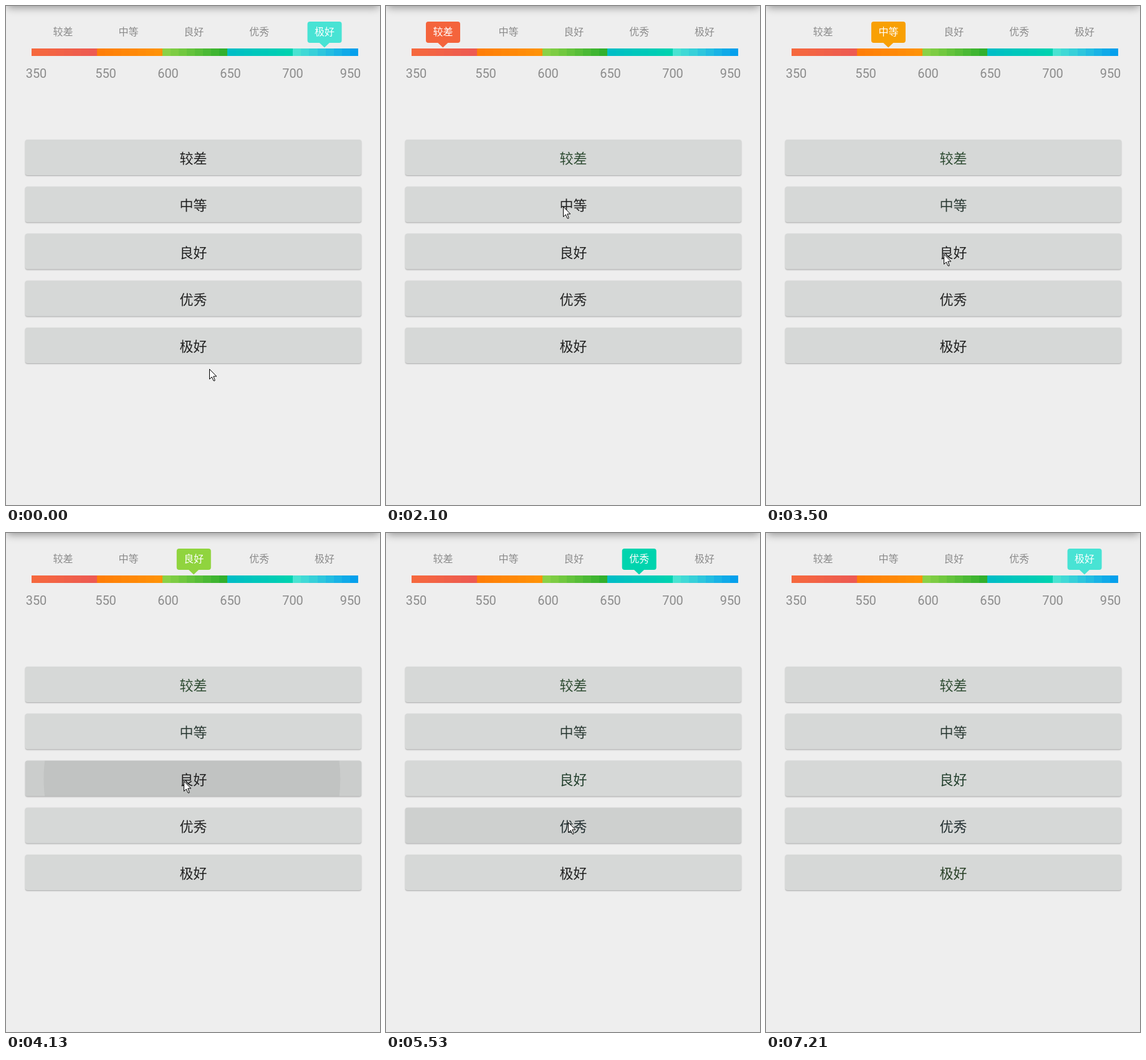
Recreate the animation shown at these times as an HTML page with a canvas. Size 600 px wide and 799 px high, loop 8050 ms.

```html
<!DOCTYPE html>
<html lang="zh-CN">
<head>
<meta charset="utf-8">
<title>评分等级</title>
<style>
html, body { margin: 0; width: 100%; height: 100%; overflow: hidden; background: #eee; }
canvas { display: block; }
</style>
</head>
<body>
<canvas id="stage" width="600" height="799"></canvas>
<script>
const ctx = document.getElementById('stage').getContext('2d');
const LOOP = 8050, STEP = 70;
const CJK = '"Noto Sans CJK SC", "Noto Sans CJK", "Noto Sans SC", sans-serif';

const levels = [
  { name: '较差', bubble: '#f4643c', from: [245, 104, 62], to: [237, 90, 82], ink: '#2f4c33' },
  { name: '中等', bubble: '#f8a004', from: [255, 126, 8], to: [255, 146, 8], ink: '#2b3a34' },
  { name: '良好', bubble: '#90d43e', from: [138, 209, 70], to: [50, 176, 46], ink: '#24402e' },
  { name: '优秀', bubble: '#00d4ae', from: [0, 190, 197], to: [0, 210, 176], ink: '#222e30' },
  { name: '极好', bubble: '#48e3d4', from: [74, 227, 210], to: [6, 160, 236], ink: '#2b4229' }
];
const scores = [[350, 48.5], [550, 160], [600, 260], [650, 360], [700, 460], [950, 552.5]];

// Press start, release, end of the ripple, ink change, touch point
const presses = [
  { down: 1190, up: 1365, end: 1680, ink: 1680, x: 273, y: 248 },
  { down: 2730, up: 2922, end: 3290, ink: 2870, x: 284, y: 321 },
  { down: 3850, up: 4085, end: 4340, ink: 4340, x: 285, y: 397 },
  { down: 5110, up: 5330, end: 5670, ink: 5390, x: 292, y: 463 },
  { down: 6160, up: 6390, end: 6720, ink: 6300, x: 295, y: 543 }
];

// Pointer moves: first step, last step, destination
const moves = [
  [70, 420, 271, 250], [490, 490, 273, 248], [1820, 2100, 284, 321],
  [3290, 3500, 285, 397], [4480, 4830, 292, 463], [5670, 5880, 296, 542],
  [5950, 5950, 296, 544], [6720, 6930, 479, 660], [7000, 7140, 552, 772]
];
const POINTER_GONE = 7210;

const clamp = v => Math.max(0, Math.min(1, v));
const mix = (a, b, k) => a + (b - a) * k;
const centre = i => 91.3 + i * 104.9;
const buttonTop = i => 214 + i * 75.25;

function label(text, x, y, font, color) {
  ctx.font = font;
  ctx.fillStyle = color;
  ctx.textAlign = 'center';
  ctx.fillText(text, x, y);
}

function box(x, y, w, h, r) {
  ctx.beginPath();
  ctx.roundRect(x, y, w, h, r);
}

function topShadow() {
  ctx.save();
  ctx.shadowColor = 'rgba(0,0,0,.37)';
  ctx.shadowBlur = 12;
  ctx.shadowOffsetY = 3;
  ctx.fillStyle = '#000';
  ctx.fillRect(2, -40, 596, 40);
  ctx.restore();
}

function scale() {
  const cells = 8, width = 104.8;
  levels.forEach((level, i) => {
    for (let c = 0; c < cells; c++) {
      const rgb = level.from.map((v, n) => Math.round(mix(v, level.to[n], c / (cells - 1))));
      const x = Math.round(41 + width * (i + c / cells));
      const right = Math.round(41 + width * (i + (c + 1) / cells));
      ctx.fillStyle = `rgb(${rgb})`;
      ctx.fillRect(x, 68, right - x, 12);
    }
  });
  scores.forEach(([n, x]) => label(n, x, 115, '20px Roboto, sans-serif', '#8b8b8b'));
}

function bubble(i) {
  const x = centre(i);
  ctx.fillStyle = levels[i].bubble;
  box(x - 27.3, 25, 55, 34, 4);
  ctx.fill();
  ctx.beginPath();
  ctx.moveTo(x - 8.5, 58.5);
  ctx.lineTo(x, 66.5);
  ctx.lineTo(x + 8.5, 58.5);
  ctx.fill();
}

function ripple(p, t, midX, midY) {
  const fade = 1 - clamp((t - p.up) / 310);
  const tint = 0.06 * fade * clamp((t - p.down + STEP) / 140);
  ctx.fillStyle = `rgba(0,0,0,${tint})`;
  ctx.fillRect(30, midY - 30, 541, 60);

  const slow = 18 * (Math.min(t, p.up) - p.down) / 140;
  const k = t < p.up ? 0 : 1 - Math.pow(400, -1.4 * (t - p.up) / 190);
  ctx.fillStyle = `rgba(0,0,0,${0.06 * fade})`;
  ctx.beginPath();
  ctx.arc(mix(p.x, midX, k), mix(p.y, midY, k), mix(slow, 271, k), 0, Math.PI * 2);
  ctx.fill();
}

function button(i, t) {
  const p = presses[i], y = buttonTop(i);
  const active = t >= p.down && t < p.end;
  const lift = active ? clamp((t - p.down + 50) / 100) * clamp(1 - (t - p.up) / 40) : 0;
  ctx.save();
  ctx.shadowColor = `rgba(0,0,0,${0.3 + 0.08 * lift})`;
  ctx.shadowBlur = 2 + 4 * lift;
  ctx.shadowOffsetY = 1 + 1.5 * lift;
  ctx.fillStyle = '#d6d8d7';
  box(31, y, 539, 57, 3.5);
  ctx.fill();
  ctx.restore();

  if (active) {
    ctx.save();
    box(31, y, 539, 57, 3.5);
    ctx.clip();
    ripple(p, t, 300.5, y + 28.5);
    ctx.restore();
  }
  label(levels[i].name, 300.5, y + 38, `500 22px ${CJK}`, t >= p.ink ? levels[i].ink : '#212121');
}

function pointer(t) {
  if (t >= POINTER_GONE) return;
  let x = 326, y = 581;
  for (const [start, last, toX, toY] of moves) {
    if (t < start) break;
    const u = clamp((t - start + STEP) / (last - start + STEP));
    const k = u * u * (3 - 2 * u);
    x = mix(x, toX, k);
    y = mix(y, toY, k);
  }
  ctx.save();
  ctx.translate(Math.round(x) + 0.5, Math.round(y) + 0.5);
  ctx.lineWidth = 1;
  ctx.strokeStyle = '#000';
  ctx.fillStyle = '#fff';
  ctx.stroke(ctx.fill(arrow) || arrow);
  ctx.restore();
}
const arrow = new Path2D('M0 0V16L3.7 12.5L6.5 18.5H8.5V17L6.3 11.5H11.3Z');

function draw(t) {
  ctx.fillStyle = '#eee';
  ctx.fillRect(0, 0, 600, 799);
  topShadow();
  scale();
  const clicked = presses.filter(p => t >= p.up).length;
  const chosen = clicked ? clicked - 1 : 4;
  bubble(chosen);
  levels.forEach((level, i) => {
    label(level.name, centre(i) + 0.2, 47, `16px ${CJK}`, i === chosen ? '#fff' : '#8b8b8b');
    button(i, t);
  });
  pointer(t);
}

const began = performance.now();
function tick() {
  let t = Math.floor(((performance.now() - began) % LOOP) / STEP) * STEP;
  // The screen stalls here for a moment
  if (t > 4130 && t < 4340) t = 4130;
  draw(t);
  requestAnimationFrame(tick);
}
tick();
</script>
</body>
</html>
```
